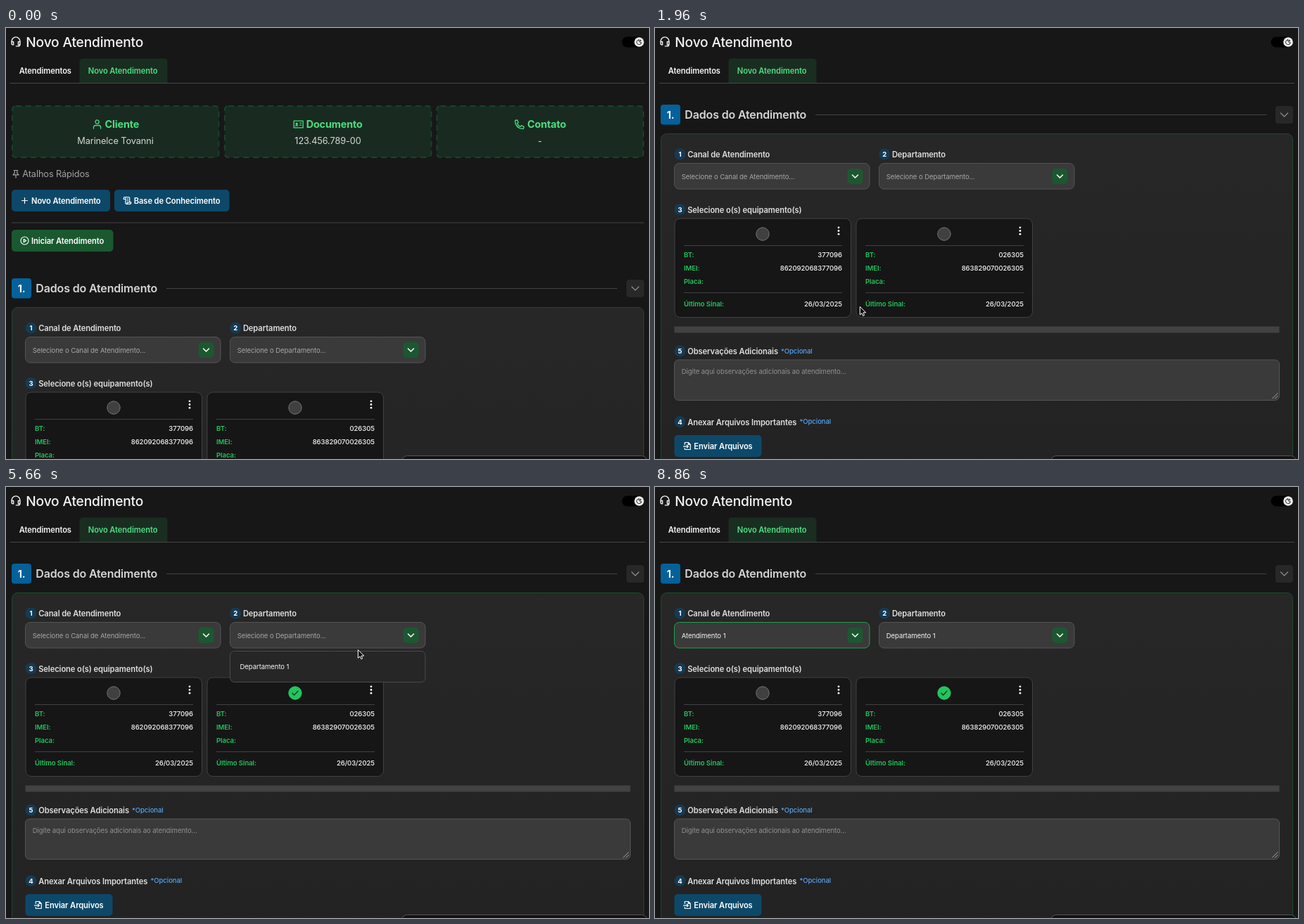
Write an HTML page that moves like this. It is 914 px wide and 613 px high and loops after 9.27 s.

```html
<!DOCTYPE html>
<html lang="pt-BR">
<head>
<meta charset="utf-8">
<title>Novo Atendimento</title>
<style>
html, body { margin: 0; width: 100%; height: 100%; overflow: hidden; background: #171718; }
svg { display: block; width: 914px; height: 613px; font-family: Inter, sans-serif; }
text { letter-spacing: -.01em; }
</style>
</head>
<body>
<svg id="stage" viewBox="0 0 914 613" xmlns="http://www.w3.org/2000/svg"></svg>
<script>
const LOOP = 9270;
const $ = id => document.getElementById(id);

// Drawing helpers
const rect = (x, y, w, h, r, fill, extra = '') =>
  `<rect x="${x}" y="${y}" width="${w}" height="${h}" rx="${r}" fill="${fill}" ${extra}/>`;
const text = (x, y, s, size, weight, fill, extra = '') =>
  `<text x="${x}" y="${y}" font-size="${size}" font-weight="${weight}" fill="${fill}" ${extra}>${s}</text>`;
const line = (x1, x2, y, color = '#424244') =>
  `<path d="M${x1} ${y}H${x2}" stroke="${color}" fill="none"/>`;
const icon = (x, y, d, color, w = 1.2) =>
  `<path transform="translate(${x} ${y})" d="${d}" fill="none" stroke="${color}" stroke-width="${w}" stroke-linecap="round" stroke-linejoin="round"/>`;
const MID = 'text-anchor="middle"', END = 'text-anchor="end"';
const CHEVRON = 'M-4 -2L0 2L4 -2';

const infoCard = (x, titleX, title, value, d) =>
  rect(x + 1, 111, 293.5, 73, 5, '#192b20', 'stroke="#174229" stroke-width="2" stroke-dasharray="8 6"') +
  icon(titleX - 11, 137, d, '#4ade80', 1.3) +
  text(titleX, 142, title, 14.4, 700, '#4ade80') +
  text(x + 147.5, 165, value, 12.8, 400, '#d6d6d6', MID);

const button = (x, y, w, label, textX, fill, d, id = '') =>
  rect(x, y, w, 31, 5, fill, id && `id="${id}"`) +
  icon(textX - 9.5, y + 15.5, d, '#fff') +
  text(textX, y + 20, label, 11.2, 600, '#fff');

const label = (x, y, n, s, opt) =>
  `<circle cx="${x}" cy="${y}" r="8" fill="#153b54"/>` +
  text(x, y + 3.5, n, 9.6, 700, '#fff', MID) +
  text(x + 10.7, y + 4.5, s, 11.2, 600, '#dedede') +
  (opt ? text(opt, y + 3.2, '*Opcional', 9.6, 500, '#56a4f0') : '');

const select = (x, id, hint) =>
  rect(x, 192.5, 277.5, 36.5, 7, '#3a3a3a', `id="${id}Box" stroke="#545454"`) +
  text(x + 10.2, 214.6, hint, 9.6, 400, '#a6a6a6', `id="${id}Text"`) +
  rect(x + 246, 200, 22, 22, 5, '#1d5731') +
  icon(x + 257, 211, CHEVRON, '#fff', 1.5);

const device = (x, bt, imei, id) => {
  const row = (y, k, v) => text(x + 13, y, k, 9.6, 600, '#22c55e') +
    text(x + 238, y, v, 9.6, 500, '#f5f5f5', END);
  return rect(x, 271, 250.5, 140.5, 8, '#161616', 'stroke="#414141"') +
    `<circle id="${id}" cx="${x + 125}" cy="293" r="9.2" fill="#404040" stroke="#757575"/>` +
    [283.8, 288.5, 293.2].map(y => `<circle cx="${x + 233}" cy="${y}" r="1.4" fill="#fff"/>`).join('') +
    line(x + 13, x + 238, 309.5) + line(x + 13, x + 238, 376.5) +
    row(326, 'BT:', bt) + row(345, 'IMEI:', imei) + row(364, 'Placa:', '') +
    row(396, 'Último Sinal:', '26/03/2025');
};

const dropdown = (x, id, option) =>
  `<g id="${id}Menu">` + rect(x, 233.5, 277.5, 44, 6, '#262626', 'stroke="#4a4a4a"') +
  rect(x + 6, 239, 265.5, 33, 4, '#3f3f3f', `id="${id}Row"`) +
  text(x + 14, 259, option, 9.6, 400, '#f5f5f5') + '</g>';

const PERSON = 'M-2.5 -3.5a2.6 2.6 0 1 0 5.2 0a2.6 2.6 0 1 0 -5.2 0M-5 6V4.5Q-5 1.5 -2 1.5H2.2Q5.2 1.5 5.2 4.5V6';
const BADGE = 'M-6.5 -4.8H6.5V4.8H-6.5ZM-4 2.4Q-2.5 .5 -1 2.4M-3.4 -1.6h1.8v1.6h-1.8ZM2 -1.8H4M2 1.2H4';
const PHONE = 'M-6 -5.5L-3.3 -6.2L-1.7 -2.6L-3.4 -1.2Q-2 1.8 1.2 3.4L2.6 1.7L6.2 3.3L5.5 6Q5 6.6 4 6.4Q-5.6 5 -6.4 -4.4Z';
const PIN = 'M-2.8 -5H2.8M-1.8 -5V-1.2L-4 1.4H4L1.8 -1.2V-5M0 1.4V5.4';
const SCROLL = 'M-5 -2V-3.6Q-5 -5 -3.6 -5H2Q3.4 -5 3.4 -3.6V2M-5 -2H-2.4M-2.4 -4V3.2Q-2.4 4.8 -.8 4.8H4Q5.4 4.8 5.4 2.4H0V3.4Q0 4.8 -1 4.8M-.2 -2.4H1.4M-.2 0H1.4';
const PLAY = 'M-5.5 0a5.5 5.5 0 1 0 11 0a5.5 5.5 0 1 0 -11 0M-1.3 -2.2V2.2L2.2 0Z';
const CLOCK = 'M-6.3 0a6.3 6.3 0 1 0 12.6 0a6.3 6.3 0 1 0 -12.6 0M0 -3.8V.4H3';
const FILE = 'M-3.5 -2V-5H1.5L4.5 -2V5H-3.5V3M1.5 -5V-2H4.5M-5.2 .7H1.5M-.5 -1.3L1.5 .7L-.5 2.7';
const HEADSET = 'M-6 1V-.6A6 6 0 0 1 6 -.6V3.4Q6 6.4 3 6.4H.4M-6 0H-3.4V4.4H-4.4Q-6 4.4 -6 2.6ZM6 0H3.4V4.4H4.4Q6 4.4 6 2.6Z';

const header =
  icon(14, 19.5, HEADSET, '#f5f5f5', 1.4) +
  text(28.3, 27, 'Novo Atendimento', 19.2, 500, '#f5f5f5') +
  rect(875.5, 12.5, 31, 15, 7.5, '#000') +
  '<circle cx="900" cy="20" r="6.8" fill="#f5f5f5"/>' +
  icon(900, 20, 'M-.4 -3.4A3.5 3.5 0 1 0 3.4 .8Q-.6 1.4 -.4 -3.4M1.8 -3V-1M.8 -2H2.8', '#222', 1) +
  text(18.8, 65.2, 'Atendimentos', 11.2, 600, '#f5f5f5') +
  '<path d="M104.5 78V48.5Q104.5 43.5 109.5 43.5H224.5Q229.5 43.5 229.5 48.5V78Z" fill="#1a2d21"/>' +
  text(116.8, 65.2, 'Novo Atendimento', 11.2, 600, '#4ade80') +
  line(6, 909, 78.5, '#464648');

const summary =
  infoCard(8, 140.5, 'Cliente', 'Marinelce Tovanni', PERSON) +
  infoCard(310, 426.7, 'Documento', '123.456.789-00', BADGE) +
  infoCard(611.5, 741, 'Contato', '-', PHONE) +
  icon(14, 207.5, PIN, '#a3a3a3') +
  text(23.3, 212, 'Atalhos Rápidos', 12.8, 400, '#a3a3a3') +
  button(8, 230, 140, 'Novo Atendimento', 36, '#0e4868', 'M-4 0H4M0 -4V4') +
  button(154, 230, 163.5, 'Base de Conhecimento', 181.8, '#0e4868', SCROLL) +
  line(8, 907, 277) +
  `<g id="start">${button(8, 287, 144.5, 'Iniciar Atendimento', 36, '#1a5930', PLAY, 'startBox')}</g>` +
  `<g id="timer">${icon(22, 299, CLOCK, '#e74a3e', 1.4)}${text(32.8, 306, '00:00:00', 19.2, 400, '#e74a3e')}</g>`;

const section =
  rect(8, 109, 28, 28.5, 4, '#05619a') +
  text(22, 129, '1.', 14.4, 700, '#fff', MID) +
  text(42.3, 129, 'Dados do Atendimento', 16, 600, '#d6d6d6') +
  line(228, 869, 123.5) +
  rect(882, 111, 25, 25, 4, '#282829') +
  icon(894.5, 123.5, 'M-5 -2.5L0 2.5L5 -2.5', '#8a8a8a', 1.3) +
  rect(8.5, 150.5, 898, 640, 8, 'url(#panel)', 'stroke="#1c4a2b"') +
  label(35.5, 179.5, 1, 'Canal de Atendimento') +
  label(326.2, 179.5, 2, 'Departamento') +
  select(27.5, 'chan', 'Selecione o Canal de Atendimento...') +
  select(318.5, 'dept', 'Selecione o Departamento...') +
  label(35.5, 258, 3, 'Selecione o(s) equipamento(s)') +
  device(28, '377096', '862092068377096', 'radioA') +
  device(286, '026305', '863829070026305', 'radioB') +
  `<g id="check">${icon(411, 293, 'M-4 .2L-1.3 3L4 -2.8', '#173d25', 1.5)}</g>` +
  rect(27.5, 424.5, 860, 9, 0, '#424242') +
  label(35.5, 459.5, 5, 'Observações Adicionais', 179) +
  rect(27.5, 472, 860, 57.5, 6, '#3a3a3a', 'stroke="#545454"') +
  text(37.7, 492, 'Digite aqui observações adicionais ao atendimento...', 9.6, 400, '#919191') +
  icon(885, 527, 'M-7.5 0L0 -7.5M-3.5 0L0 -3.5', '#b5b5b5', .9) +
  label(35.5, 560, 4, 'Anexar Arquivos Importantes', 205.5) +
  button(27.5, 579, 124, 'Enviar Arquivos', 55.3, '#0e4868', FILE) +
  dropdown(27.5, 'chan', 'Atendimento 1') +
  dropdown(318.5, 'dept', 'Departamento 1');

$('stage').innerHTML = `
  <defs>
    <clipPath id="view"><rect y="79" width="914" height="534"/></clipPath>
    <linearGradient id="panel" x2="0" y2="1"><stop stop-color="#272727"/><stop offset="1" stop-color="#212121"/></linearGradient>
  </defs>
  ${rect(0, 0, 914, 613, 0, '#171718')}${header}
  <g clip-path="url(#view)"><g id="summary">${summary}</g><g id="section">${section}</g></g>
  ${rect(562.5, 608.5, 349, 40, 8, '#121212', 'stroke="#565656"')}
  <g id="cursor" fill="#0b0b0b" stroke="#fff" stroke-width="1" stroke-linejoin="round">
    <path id="arrow" d="M.3 .3V12L3 9.6L4.7 13.4L6.6 12.6L5 8.8H8.7Z"/>
    <path id="hand" d="M-1.4 1.4Q-1.4 0 0 0T1.4 1.4V5.2L6 6.2Q7.6 6.8 7.4 8.6L6.2 14.5H.2L-3.6 9.4Q-4 8 -2.8 8L-1.4 9.2Z"/>
  </g>`;

// Bursts of motion: start, end, number of steps
const BURSTS = [[70, 780, 11], [970, 1500, 6], [1630, 1830, 4], [1960, 2860, 14], [2930, 3000, 2],
  [3150, 4030, 12], [4100, 4170, 2], [4370, 5250, 13], [5520, 5940, 7], [6140, 6820, 11],
  [7020, 7830, 12], [7950, 8860, 14]];
// Pointer path: time, x, y
const PATH = [[70, 686, 564], [780, 99, 306], [970, 101, 307], [1400, 294, 398], [1830, 294, 398],
  [1960, 291, 396], [2860, 405, 313], [3000, 402, 310], [3360, 407, 291], [3580, 407, 291],
  [4030, 272, 329], [4100, 259, 318], [4170, 274, 308], [4370, 310, 304], [4950, 566, 200],
  [5250, 565, 210], [5450, 565, 210], [5940, 400, 264], [6140, 400, 264], [6820, 273, 208],
  [7160, 273, 208], [7830, 110, 264], [8020, 110, 264], [8860, 760, 630]];
const SCROLLS = [[1300, 0], [1500, 80], [1630, 92], [1830, 160], [1960, 240]];

function snap(t) {
  const b = BURSTS.filter(([s]) => s <= t).pop();
  if (!b) return 0;
  const [s, e, n] = b, step = (e - s) / (n - 1);
  return s + Math.min(n - 1, Math.floor((t - s) / step + 1e-6)) * step;
}

function along(keys, t) {
  const i = keys.findIndex(k => k[0] > t);
  if (i === 0) return keys[0].slice(1);
  if (i < 0) return keys[keys.length - 1].slice(1);
  const a = keys[i - 1], b = keys[i], u = (t - a[0]) / (b[0] - a[0]);
  const k = u * u * (3 - 2 * u);
  return a.slice(1).map((v, j) => v + (b[j + 1] - v) * k);
}

const show = (id, on) => $(id).setAttribute('visibility', on ? 'visible' : 'hidden');
const set = (id, k, v) => $(id).setAttribute(k, v);

function field(id, hint, value, chosen, focused) {
  $(id + 'Text').textContent = chosen ? value : hint;
  set(id + 'Text', 'fill', chosen ? '#f5f5f5' : '#a6a6a6');
  set(id + 'Box', 'stroke', focused ? '#22a04f' : '#545454');
}

function draw(time) {
  const t = snap(time), [x, y] = along(PATH, t), [scroll] = along(SCROLLS, t);
  const over = (l, tp, r, b) => x >= l && x <= r && y >= tp && y <= b;
  const started = t >= 970, picked = t >= 3430;
  const deptOpen = t >= 5100 && t < 6140, chanOpen = t >= 7090 && t < 7950;

  set('summary', 'transform', `translate(0 ${-Math.round(scroll)})`);
  set('section', 'transform', `translate(0 ${Math.round((started ? 240 : 247) - scroll)})`);
  show('start', !started);
  show('timer', started);

  const overStart = !started && over(8, 287, 152, 318);
  set('startBox', 'fill', overStart ? '#15803d' : '#1a5930');
  set('radioB', 'fill', picked ? '#22c55e' : '#404040');
  set('radioB', 'stroke', picked ? '#22c55e' : '#757575');
  show('check', picked);

  field('dept', 'Selecione o Departamento...', 'Departamento 1', t >= 6140, t >= 6140 && t < 7090);
  field('chan', 'Selecione o Canal de Atendimento...', 'Atendimento 1', t >= 7950, t >= 7950);
  show('deptMenu', deptOpen);
  show('chanMenu', chanOpen);
  const overDept = deptOpen && over(324, 239, 590, 272);
  const overChan = chanOpen && over(33, 239, 299, 272);
  show('deptRow', overDept);
  show('chanRow', overChan);

  const settled = t >= 1960;
  const hand = overStart || overDept || overChan || settled && (
    over(401, 283, 421, 303) || over(27, 192, 305, 229) || over(318, 192, 596, 229));
  const visible = t >= 70 && t < 8860;
  set('cursor', 'transform', `translate(${x.toFixed(1)} ${y.toFixed(1)})`);
  show('arrow', visible && !hand);
  show('hand', visible && hand);
}

const t0 = performance.now();
function tick() {
  draw((performance.now() - t0) % LOOP);
  requestAnimationFrame(tick);
}
tick();
</script>
</body>
</html>
```
